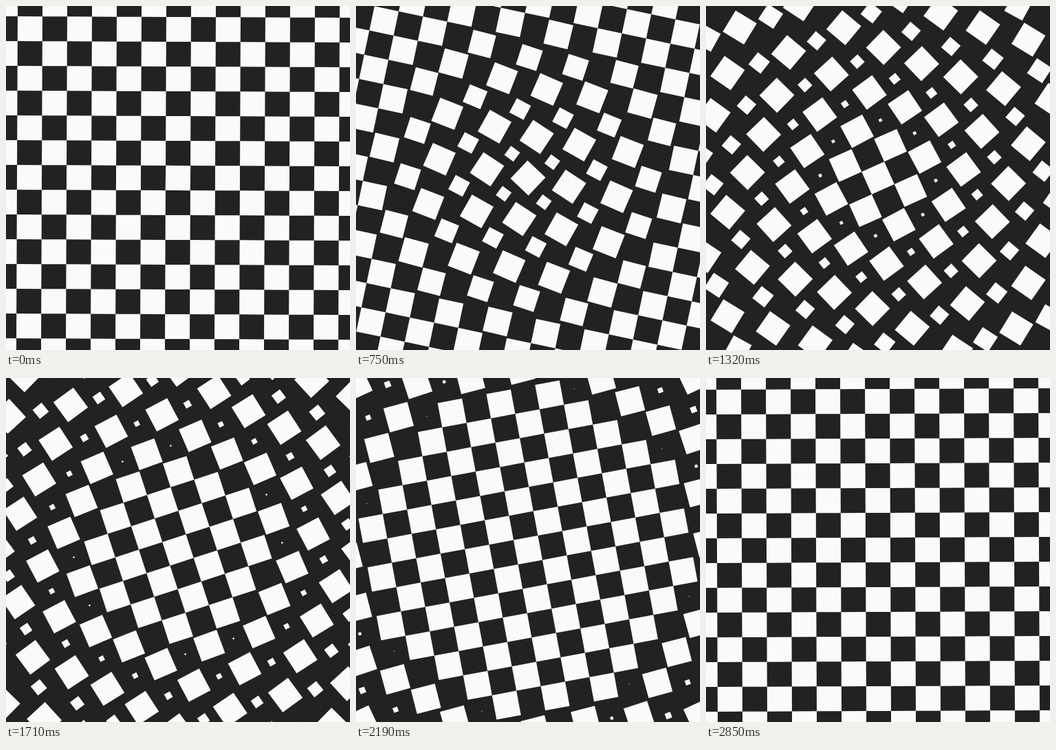
Animation of 500 by 500 pixels, one loop 2.88 s. Source, as an HTML page with a canvas:

```html
<!DOCTYPE html>
<html lang="en">
<head>
<meta charset="utf-8">
<title>Checkerboard twist</title>
<style>
  html, body { margin: 0; width: 100%; height: 100%; overflow: hidden; background: #222; }
  canvas { display: block; width: 100vw; height: 100vh; }
</style>
</head>
<body>
<canvas id="stage" width="500" height="500"></canvas>
<script>
const ctx = document.getElementById('stage').getContext('2d');
const LOOP = 2880, STEP = 30;
const CELL = 36, REACH = 15;
const SPEED = 0.298; // wave front, px per ms
const BAND = 325;    // width of the wave, px

const clamp01 = x => Math.min(1, Math.max(0, x));

function drawTile(i, j, time) {
  const dist = Math.hypot(i, j) * CELL;
  const p = clamp01((SPEED * time - dist) / BAND);
  const size = i % 2 === 0 ? CELL : CELL * (1 - p);
  if (size <= 0) return;
  const shrink = Math.pow(2, -p / 2) * CELL;
  ctx.save();
  ctx.translate(i * shrink, j * shrink);
  ctx.rotate(p * Math.PI / 4);
  ctx.fillRect(-size / 2, -size / 2, size, size);
  ctx.restore();
}

function draw(time) {
  ctx.setTransform(1, 0, 0, 1, 0, 0);
  ctx.fillStyle = '#222';
  ctx.fillRect(0, 0, 500, 500);
  ctx.translate(250, 250);
  ctx.rotate(time / LOOP * Math.PI / 4);
  ctx.fillStyle = '#fafafa';
  for (let i = -REACH; i <= REACH; i++) {
    for (let j = -REACH; j <= REACH; j++) {
      if ((i + j) % 2 === 0) drawTile(i, j, time);
    }
  }
}

const start = performance.now();
function tick() {
  const t = (performance.now() - start) % LOOP;
  draw((Math.floor(t / STEP) + 0.5) * STEP);
  requestAnimationFrame(tick);
}
tick();
</script>
</body>
</html>
```
